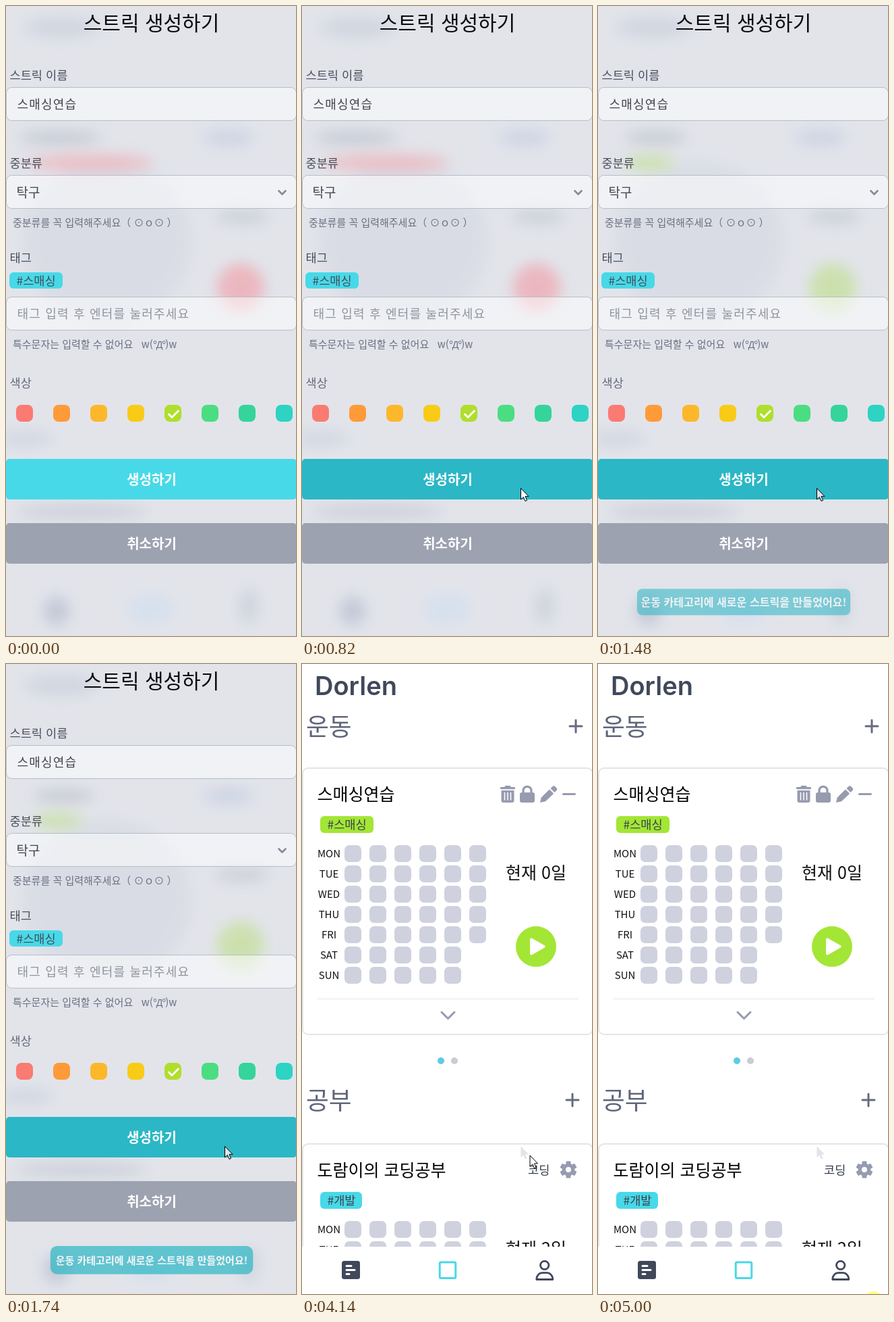
An HTML page for the animation above (5.14 s loop, 430 by 932 pixels).

```html
<!DOCTYPE html>
<html lang="ko">
<head>
<meta charset="utf-8">
<style>
html, body { margin: 0; width: 100%; height: 100%; overflow: hidden; background: #fff; }
svg { display: block; width: 430px; height: 932px; font-family: "Noto Sans CJK KR", "Noto Sans CJK", sans-serif; }
</style>
</head>
<body>
<svg id="stage" viewBox="0 0 430 932">
  <defs>
    <filter id="blur" x="-50%" y="-100%" width="200%" height="300%"><feGaussianBlur stdDeviation="10"/></filter>
    <path id="arrow" d="M.5.5V17L4.3 13.4L7 19.5L9.6 18.4L7 12.4H12Z"/>
  </defs>
  <g id="form"></g>
  <g id="home"></g>
  <use id="ghost" href="#arrow" x="324" y="713" fill="#e2e4e9"/>
  <use id="cursor" href="#arrow" stroke="#000" stroke-linejoin="round"/>
  <circle id="halo" cx="408.5" cy="944" r="16" fill="#ffff80"/>
</svg>
<script>
const LOOP = 5140;
const CYAN = '#48d9e8', CYAN_DARK = [43, 183, 197], CYAN_RGB = [72, 217, 232];
const LIME = '#a3e635', ICON = '#979bb0', INK = '#40485a';
const $ = id => document.getElementById(id);

const text = (s, x, y, size, weight, fill, extra = '') =>
  `<text x="${x}" y="${y}" font-size="${size}" font-weight="${weight}" fill="${fill}" ${extra}>${s}</text>`;
const rect = (x, y, w, h, r, fill, extra = '') =>
  `<rect x="${x}" y="${y}" width="${w}" height="${h}" rx="${r}" fill="${fill}" ${extra}/>`;
const line = (d, color, width, extra = '') =>
  `<path d="${d}" fill="none" stroke="${color}" stroke-width="${width}" stroke-linecap="round" stroke-linejoin="round" ${extra}/>`;
const blob = (cx, cy, rx, ry, fill, opacity = 0.7) =>
  `<ellipse cx="${cx}" cy="${cy}" rx="${rx}" ry="${ry}" fill="${fill}" opacity="${opacity}" filter="url(#blur)"/>`;
const middle = 'text-anchor="middle"';

function buildForm() {
  const field = y => rect(0.5, y + 0.5, 430, 49, 8, '#fff', 'fill-opacity=".52" stroke="#b3bec9"');
  const label = (s, y, fill = '#4a4e5c') => text(s, 5.5, y, 17.6, 400, fill);
  const hint = (s, y) => text(s, 10, y, 15, 500, '#6b7080');
  const swatches = ['#f97b72', '#ff9a38', '#fdb72a', '#f8cb17', '#b0de2d', '#4bdd81', '#35d49a', '#2dd3c3'];
  const spaced = 'letter-spacing="1.2"';
  return rect(0, 0, 430, 932, 0, '#e2e4ea')
    + blob(150, 350, 125, 120, '#d4d7e2', 0.55)
    + blob(82, 32, 55, 16, '#cbd0dc')
    + blob(330, 195, 38, 12, '#c6cee2')
    + blob(350, 312, 40, 10, '#c3c7d0')
    + blob(30, 640, 40, 12, '#cdd3e0')
    + blob(112, 748, 98, 10, '#c3c7d2')
    + blob(75, 895, 20, 22, '#b9c0d0')
    + blob(215, 892, 35, 22, '#d2dfef')
    + blob(360, 888, 14, 26, '#c8cdd8')
    + `<g id="oldBlobs">${blob(80, 195, 62, 10, '#bcc1cd')}${blob(125, 232, 95, 13, '#eeb0b8')}${blob(348, 416, 35, 35, '#f0a4ae')}</g>`
    + `<g id="newBlobs">${blob(86, 195, 46, 10, '#bcc1cd')}${blob(76, 232, 38, 12, '#c3df9a')}${blob(348, 416, 35, 35, '#c3df96')}</g>`
    + text('스트릭 생성하기', 215.5, 36, 30, 500, '#0a0a0c', middle)
    + label('스트릭 이름', 108.5) + field(120)
    + text('스매싱연습', 16.5, 152, 18, 300, '#40444f', spaced)
    + label('중분류', 238.5) + field(250)
    + text('탁구', 15.5, 283, 19, 300, '#40444f')
    + line('M404.5 273.5l5 5l5-5', '#858a98', 2.6)
    + hint('중분류를 꼭 입력해주세요（ ⊙ｏ⊙ ）', 326)
    + label('태그', 378.5)
    + rect(5, 394, 79, 24, 6, CYAN) + text('#스매싱', 15.4, 412.5, 17.6, 400, '#444c5a')
    + field(430) + text('태그 입력 후 엔터를 눌러주세요', 16.5, 462, 18, 300, '#8f949f', spaced)
    + hint('특수문자는 입력할 수 없어요\u00a0\u00a0\u00a0w(<tspan font-family="Noto Sans, sans-serif" font-size="14" font-weight="400" letter-spacing="-1.1">°Д°</tspan>)w', 506)
    + label('색상', 563.5, '#666b7a')
    + swatches.map((color, i) => rect(15 + 55 * i, 590, 25, 25, 8, color)).join('')
    + line('M241.5 604l4.5 4.5l9.5-9.5', '#fff', 2.8)
    + rect(0, 670, 431, 60, 5, CYAN, 'id="create"') + text('생성하기', 216, 708, 20, 700, '#fff', middle)
    + rect(0, 765, 431, 60, 5, '#9ca2af') + text('취소하기', 216, 803, 20, 700, '#fff', middle)
    + `<g id="toast">${rect(0, 0, 0, 0, 0, `rgb(${CYAN_DARK})`)}${text('운동 카테고리에 새로운 스트릭을 만들었어요!', 216, 887.5, 15, 700, '#fff', middle)}</g>`;
}

function card(top, title, tag, tagWidth, tagColor, days, tools) {
  const names = ['MON', 'TUE', 'WED', 'THU', 'FRI', 'SAT', 'SUN'];
  const rows = names.map((name, r) => {
    let row = text(name, 40, 133 + 30 * r, 15, 400, '#111', middle);
    for (let c = 0; c < (r < 5 ? 6 : 5); c++) row += rect(63 + 37 * c, 115 + 30 * r, 25, 25, 7, '#cfd1de');
    return row;
  }).join('');
  return `<g transform="translate(0 ${top})">`
    + rect(1, 1, 430, 394, 8, '#fff', 'stroke="#e5e5e9" stroke-width="2"')
    + text(title, 22.5, 49, 25, 500, '#000')
    + rect(27, 72, tagWidth, 25, 6, tagColor) + text(tag, 37.4, 91, 17.6, 400, '#3c4250')
    + rows
    + text(`현재 ${days}일`, 347, 165, 25, 400, '#111', middle)
    + `<circle cx="347" cy="265" r="30" fill="${tagColor}"/>`
    + `<path d="M340 254.5V275.5L358.5 265Z" fill="#fff" stroke="#fff" stroke-width="4" stroke-linejoin="round"/>`
    + `<path d="M22 342.5H410" stroke="#e5e5e9"/>`
    + line('M207 362l9.5 9.5l9.5-9.5', ICON, 3)
    + tools + '</g>';
}

function buildHome() {
  const plus = (x, y) => line(`M${x - 9} ${y}h18M${x} ${y - 9}v18`, '#666b80', 3);
  const heading = (s, y) => text(s, 6, y, 36.8, 300, '#5f657a');
  const trash = rect(294, 29, 22, 3.2, 1.2, ICON) + rect(300.5, 27, 9, 4, 1.5, ICON)
    + `<path d="M295.5 34h19v15q0 3-3 3h-13q-3 0-3-3z" fill="${ICON}"/>`
    + line('M300.5 37.5v10.5M305 37.5v10.5M309.5 37.5v10.5', '#fff', 1.5);
  const lock = rect(323, 37, 22, 15, 3, ICON) + line('M328 38v-4a6 5.6 0 0 1 12 0v4', ICON, 3.3);
  const pencil = `<path d="M353 52l1.7-7.5L367 32.5l6.2 6.2L361 50.3zM368.5 31l2.8-2.8q2-2 4 0l2 2q2 2 0 4l-2.8 2.8z" fill="${ICON}"/>`;
  const minus = line('M387.5 39.5h17', ICON, 3);
  let gear = `<circle cx="395" cy="39" r="6.7" fill="none" stroke="${ICON}" stroke-width="5.4"/>`;
  for (let a = 0; a < 360; a += 60) gear += rect(391.5, 26.5, 7, 5, 1.2, ICON, `transform="rotate(${a} 395 39)"`);

  return rect(0, 0, 430, 932, 0, '#fff')
    + text('Dorlen', 19, 46, 38, 600, INK, 'font-family="Inter, sans-serif"')
    + heading('운동', 105.5) + plus(406, 92)
    + card(153, '스매싱연습', '#스매싱', 79, LIME, 0, trash + lock + pencil + minus)
    + '<circle cx="206" cy="587" r="5" fill="#5bcbe6"/><circle cx="226" cy="587" r="5" fill="#cbccd3"/>'
    + heading('공부', 658.5) + plus(401, 645)
    + card(709, '도람이의 코딩공부', '#개발', 62, CYAN, 2, text('코딩', 335, 45.5, 17.6, 300, '#333a48') + gear)
    + rect(0, 862, 430, 70, 0, '#fff')
    + rect(59, 883, 27, 27, 3.5, INK) + line('M66 890.5h7M66 896.5h12M66 902.5h4', '#fff', 3)
    + rect(204.2, 885, 23.6, 23.6, 2, 'none', `stroke="${CYAN}" stroke-width="3"`)
    + `<circle cx="359.7" cy="889.5" r="6.2" fill="none" stroke="${INK}" stroke-width="2.8"/>`
    + line('M347.8 910.5c0-6 4-9.8 9-9.8h6c5 0 9 3.8 9 9.8z', INK, 2.8);
}

const clamp = v => Math.min(1, Math.max(0, v));
const mix = (a, b, p) => a + (b - a) * p;
const show = (id, on) => $(id).style.display = on ? '' : 'none';

// cubic-bezier(.25, .1, .25, 1), solved by bisection
function ease(x) {
  const bezier = (u, a, b) => 3 * u * (1 - u) ** 2 * a + 3 * u * u * (1 - u) * b + u ** 3;
  let lo = 0, hi = 1;
  for (let i = 0; i < 20; i++) {
    const u = (lo + hi) / 2;
    if (bezier(u, 0.25, 0.25) < x) lo = u; else hi = u;
  }
  return bezier(lo, 0.1, 1);
}

function drawToast(t) {
  const p = ease(clamp((t - 1240) / 500));
  const size = mix(20, 15, p), pad = 10 * p;
  const width = 18.7 * size + 2 * pad, height = 1.45 * size + 2 * pad;
  const [box, label] = $('toast').children;
  const attrs = { x: 216 - width / 2, y: 881.8 - height / 2, width, height, rx: 10 * p };
  for (const name in attrs) box.setAttribute(name, attrs[name]);
  label.setAttribute('font-size', size);
  label.setAttribute('y', 882 + 0.37 * size);
  $('toast').setAttribute('opacity', 0.7 * p);
  show('toast', t >= 1340);
}

function drawCursor(t) {
  let x = 324, y = 713;
  if (t < 820) {
    const rest = (1 - clamp((t - 200) / 620)) ** 2.2;
    x += 78 * rest;
    y += 212 * rest;
  } else if (t >= 4140) {
    const p = clamp((t - 4070) / 410);
    x += 78 * p;
    y += 188 * p ** 1.5;
  }
  $('cursor').setAttribute('x', x);
  $('cursor').setAttribute('y', y);
  $('cursor').setAttribute('fill', t >= 1150 && t < 4140 ? '#e4e5ea' : '#fff');
  show('cursor', t >= 200 && t < 4550);
}

function render() {
  const t = performance.now() % LOOP;
  const hover = clamp((t - 560) / 120);
  $('create').setAttribute('fill', `rgb(${CYAN_RGB.map((c, i) => mix(c, CYAN_DARK[i], hover))})`);
  show('form', t < 2730);
  show('home', t >= 2730);
  show('oldBlobs', t < 1150);
  show('newBlobs', t >= 1150);
  show('ghost', t >= 4140);
  show('halo', t >= 5000);
  drawToast(t);
  drawCursor(t);
  requestAnimationFrame(render);
}

$('form').innerHTML = buildForm();
$('home').innerHTML = buildHome();
render();
</script>
</body>
</html>
```
